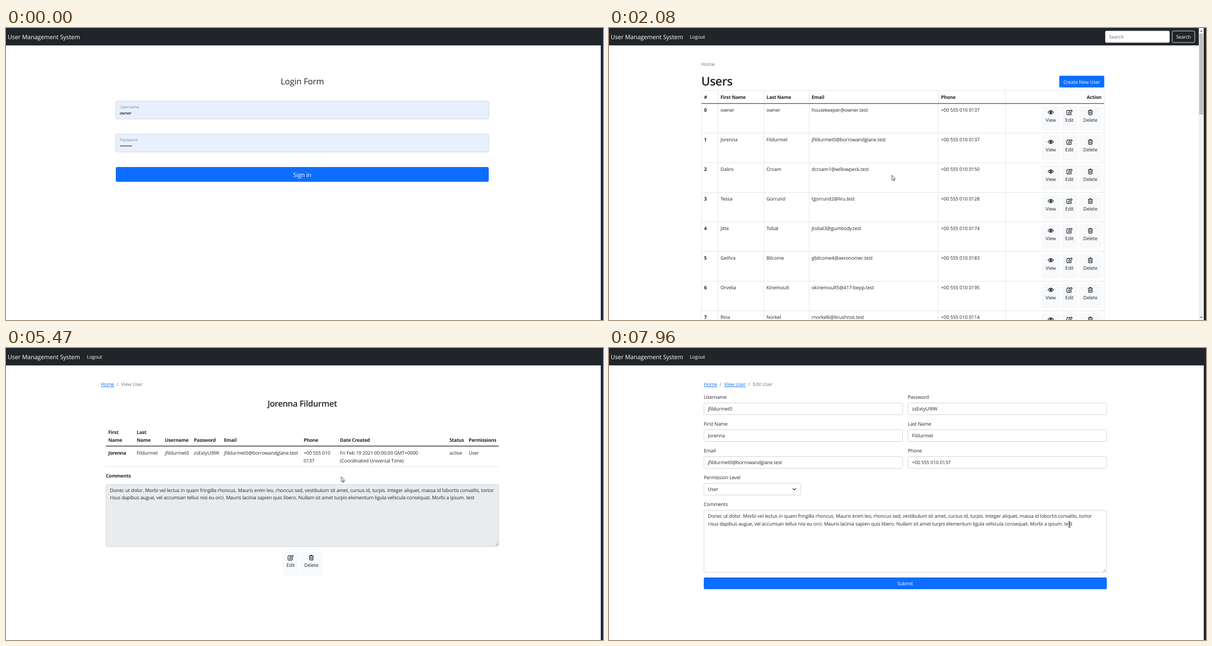
Recreate the animation shown at these times as an HTML page. Size 1071 by 523 pixels, loop 8 s.

```html
<!DOCTYPE html>
<html lang="en">
<head>
<meta charset="utf-8">
<title>User Management System</title>
<style>
html, body { margin: 0; width: 100%; height: 100%; overflow: hidden; background: #fff; }
svg { display: block; width: 1071px; height: 523px; }
text {
  font: 400 8.62px "Open Sans", "Noto Sans", sans-serif;
  letter-spacing: -.01em; fill: #212529; white-space: pre;
  text-rendering: geometricPrecision;
}
.b { font-weight: 700; letter-spacing: -.025em; }
.w { fill: #fff; }
.g { fill: #6c757d; }
.a { fill: #0d6efd; text-decoration: underline; }
.m { text-anchor: middle; }
.e { text-anchor: end; }
.lg { font-size: 10.77px; }
.h3 { font-size: 15.06px; }
.h1 { font-size: 21.5px; }
.semi { font-weight: 600; letter-spacing: -.025em; }
.label { font-size: 7.33px; fill: #868c97; }
.tiny { font-size: 7.18px; }
.url { font-size: 6.48px; fill: #e4e5e7; }
.field { fill: #fff; stroke: #ced4da; stroke-width: .9; }
.icon { fill: none; stroke: #212529; stroke-width: 1.1; stroke-linecap: round; stroke-linejoin: round; }

.t { opacity: 0; animation: 8s step-end -5ms infinite; }
#login { animation-name: login; }
#users { animation-name: users; }
#view { animation-name: view; }
#edit { animation-name: edit; }
#idle { animation-name: idle; }
#hover { animation-name: hover; }
#press { animation-name: press; }
#viewRing { animation-name: view-ring; }
#editRing { animation-name: edit-ring; }
#viewUrl { animation-name: view-url; }
#editUrl { animation-name: edit-url; }
#click { animation-name: click; }
#arrow { animation-name: arrow; }
#hand { animation-name: hand; }
#beam { animation-name: beam; }
#cursor { animation: move 8s -5ms infinite; }

@keyframes login { 0% { opacity: 1 } 26%, 100% { opacity: 0 } }
@keyframes users { 0% { opacity: 0 } 26% { opacity: 1 } 53.75%, 100% { opacity: 0 } }
@keyframes view { 0% { opacity: 0 } 53.75% { opacity: 1 } 81.5%, 100% { opacity: 0 } }
@keyframes edit { 0% { opacity: 0 } 81.5%, 100% { opacity: 1 } }
@keyframes idle { 0% { opacity: 1 } 21.125%, 100% { opacity: 0 } }
@keyframes hover { 0% { opacity: 0 } 17.875%, 100% { opacity: 1 } }
@keyframes press { 0% { opacity: 0 } 21.125%, 100% { opacity: 1 } }
@keyframes view-ring { 0% { opacity: 0 } 47.25%, 100% { opacity: 1 } }
@keyframes edit-ring { 0% { opacity: 0 } 78.125%, 100% { opacity: 1 } }
@keyframes view-url { 0% { opacity: 0 } 45.625% { opacity: 1 } 53.75%, 100% { opacity: 0 } }
@keyframes edit-url { 0% { opacity: 0 } 76.5% { opacity: 1 } 84.875%, 100% { opacity: 0 } }
@keyframes click {
  0%, 26%, 50.5%, 79.875%, 100% { opacity: 0 }
  21.125%, 47.25%, 78.125% { opacity: 1 }
}
@keyframes arrow {
  0%, 26%, 53.75%, 68.375%, 79.875% { opacity: 1 }
  17.875%, 45.625%, 61.875%, 76.5%, 84.875%, 100% { opacity: 0 }
}
@keyframes hand {
  0%, 26%, 53.75%, 79.875%, 100% { opacity: 0 }
  17.875%, 45.625%, 76.5% { opacity: 1 }
}
@keyframes beam {
  0%, 68.375% { opacity: 0 }
  61.875%, 84.875%, 100% { opacity: 1 }
}
/* the pointer is sampled about every 130 ms */
@keyframes move {
  0% { transform: translate(1100px, 0); animation-timing-function: steps(1) }
  3.25% { transform: translate(1038px, 512px); animation-timing-function: steps(3) }
  8.125% { transform: translate(850px, 300px); animation-timing-function: steps(3) }
  13% { transform: translate(526px, 227px); animation-timing-function: steps(1) }
  14.625% { transform: translate(515px, 296px); animation-timing-function: steps(1) }
  16.25% { transform: translate(511px, 281px); animation-timing-function: steps(2) }
  19.5% { transform: translate(507.5px, 263.5px); animation-timing-function: steps(1) }
  32.5% { transform: translate(513.5px, 262.5px); animation-timing-function: steps(4) }
  39% { transform: translate(720px, 148px); animation-timing-function: steps(3) }
  43.875% { transform: translate(794px, 184px); animation-timing-function: steps(1) }
  45.625% { transform: translate(794.3px, 209px); animation-timing-function: steps(1) }
  55.375% { transform: translate(794.3px, 209px); animation-timing-function: steps(7) }
  66.75% { transform: translate(618px, 206px); animation-timing-function: steps(7) }
  78.125% { transform: translate(503px, 378px); animation-timing-function: steps(1) }
  83.25% { transform: translate(503px, 378px); animation-timing-function: steps(7) }
  94.625% { transform: translate(825px, 316.5px); animation-timing-function: steps(1) }
  96.25% { transform: translate(838px, 316px); animation-timing-function: steps(1) }
  99.5%, 100% { transform: translate(826px, 316px); animation-timing-function: steps(1) }
}
</style>
</head>
<body>
<svg id="stage" viewBox="0 0 1071 523" xmlns="http://www.w3.org/2000/svg"></svg>
<script>
const text = (x, y, s, cls = '') => `<text x="${x}" y="${y}" class="${cls}">${s}</text>`;
const rect = (x, y, w, h, attrs) => `<rect x="${x}" y="${y}" width="${w}" height="${h}" ${attrs}/>`;
const line = (x1, y1, x2, y2, c = '#dee2e6', w = .8) =>
  `<path d="M${x1},${y1}L${x2},${y2}" stroke="${c}" stroke-width="${w}"/>`;
const group = (id, body) => `<g id="${id}" class="t">${body}</g>`;
const field = (x, y, w, h) => rect(x, y, w, h, 'rx="2.2" class="field"');
const range = (n, fn) => Array.from({ length: n }, (_, i) => fn(i)).join('');

const FIRST = 'Jorenna', LAST = 'Fildurmet', USER = 'jfildurmet0';
const MAIL = USER + '@borrowandglane.test', PASS = 'zsExtyU9lW', PHONE = '+00 555 010 0137';
const NOTE = [
  'Donec ut dolor. Morbi vel lectus in quam fringilla rhoncus. Mauris enim leo, rhoncus sed, vestibulum sit amet, cursus id, turpis. Integer aliquet, massa id lobortis convallis, tortor',
  'risus dapibus augue, vel accumsan tellus nisi eu orci. Mauris lacinia sapien quis libero. Nullam sit amet turpis elementum ligula vehicula consequat. Morbi a ipsum. test'
];
const PEOPLE = [
  ['owner', 'owner', 'housekeeper@owner.test', PHONE],
  [FIRST, LAST, MAIL, PHONE],
  ['Daliro', 'Croam', 'dcroam1@willowpeck.test', '+00 555 010 0150'],
  ['Tessa', 'Gorrund', 'tgorrund2@liru.test', '+00 555 010 0128'],
  ['Jitte', 'Tobal', 'jtobal3@gumbody.test', '+00 555 010 0174'],
  ['Gethra', 'Bilcome', 'gbilcome4@aeronomer.test', '+00 555 010 0183'],
  ['Orvelia', 'Kinemoult', 'okinemoult5@417-bepp.test', '+00 555 010 0195'],
  ['Rina', 'Norkel', 'rnorkel6@brushnot.test', '+00 555 010 0114']
];

const defs = `<defs>
  <g id="iView" class="icon"><path d="M-5,0Q0,-6.2 5,0Q0,6.2 -5,0Z"/>
    <circle r="1.7" fill="#212529"/><circle cx="-.7" cy="-.7" r=".6" fill="#fff" stroke="none"/></g>
  <g id="iEdit" class="icon"><path d="M.8,-3.4H-3.6Q-4.6,-3.4 -4.6,-2.4V3.4Q-4.6,4.4 -3.6,4.4H2.2Q3.2,4.4 3.2,3.4V1"/>
    <path d="M-1.6,2L-1.3,.1L3.2,-4.4L5,-2.6L.4,1.8Z"/></g>
  <g id="iDelete" class="icon"><path d="M-4,-3H4M-1.5,-3.2L-1,-4.4H1L1.5,-3.2M-3.2,-3V3.6Q-3.2,4.5 -2.3,4.5H2.3Q3.2,4.5 3.2,3.6V-3M-1.2,-1V2.7M1.2,-1V2.7"/></g>
</defs>`;

const nav = (w, logout) => rect(0, 0, w, 31.2, 'fill="#212529"')
  + text(3, 20, 'User Management System', 'w lg')
  + (logout ? text(145, 19, 'Logout', 'w') : '');

const tool = (name, x, y, w) => rect(x, y, w, 44, 'rx="2" fill="#f8f9fa"')
  + `<use href="#i${name}" x="${x + w / 2}" y="${y + 11.5}"/>`
  + text(x + w / 2, y + 28, name, 'm');

const ring = (id, x, y, w, h) => group(id, rect(x, y, w, h, 'rx="3" fill="none" stroke="#dfe1e3" stroke-width="2"'));
const grip = (x, y) => line(x - 6, y - 1.5, x - 1.5, y - 6, '#777', .7) + line(x - 3.5, y - 1.5, x - 1.5, y - 3.5, '#777', .7);
const crumbs = (...items) => items.map(([x, s, cls]) => text(x, 68, s, cls)).join('');

function loginScene() {
  const box = y => rect(197, y, 669, 32, 'rx="2.2" fill="#e8f0fe" stroke="#ced4da" stroke-width=".9"');
  const dots = (step, r) => range(8, i => `<circle cx="${205.6 + i * step}" cy="211.2" r="${r}" fill="#212529"/>`);
  const button = c => rect(197, 249, 669, 26.5, `rx="2.7" fill="${c}"`);
  return nav(1067) + text(531.5, 101, 'Login Form', 'h3 m')
    + box(131) + text(204, 143.5, 'Username', 'label')
    + box(190) + text(204, 202.5, 'Password', 'label')
    + group('idle', text(204, 155, 'owner', 'tiny semi') + dots(2.7, 1))
    + button('#0d6efd')
    + group('hover', button('#0b5ed7'))
    + group('press', text(204, 155, 'owner') + dots(3.7, 1.4)
      + rect(195.9, 247.9, 671.2, 28.7, 'rx="3.6" fill="none" stroke="#98c1fe" stroke-width="2.3"') + button('#0a58ca'))
    + text(531.5, 267, 'Sign in', 'lg w m');
}

function userRow(p, i) {
  const y = 135.5 + 53 * i, cols = [200, 282.5, 363.5, 595.5];
  return text(170.5, y + 14.7, i, 'b')
    + p.map((s, k) => text(cols[k], y + 14.7, s)).join('')
    + tool('View', 776, y + 4, 33) + tool('Edit', 811.5, y + 4, 29) + tool('Delete', 843.5, y + 4, 40)
    + line(166, y + 53, 888, y + 53);
}

function usersScene() {
  const heads = [[170.5, '#'], [200, 'First Name'], [282.5, 'Last Name'], [363.5, 'Email'], [595.5, 'Phone']];
  return nav(1058, true)
    + field(890.5, 5.3, 115, 20.7) + text(897, 19, 'Search', 'g')
    + rect(1010.4, 5.3, 40.4, 20.7, 'rx="2.2" fill="none" stroke="#f8f9fa" stroke-width=".8"') + text(1030.7, 19, 'Search', 'w m')
    + text(165.5, 68, 'Home', 'g') + text(165.5, 103, 'Users', 'h1 semi')
    + rect(807.7, 85.4, 80.8, 21.2, 'rx="2.2" fill="#0d6efd"') + text(848.2, 99.5, 'Create New User', 'w m')
    + line(166, 111.9, 888, 111.9)
    + [165.8, 195.5, 278, 359, 590.5, 711.5, 888.2].map(x => line(x, 112, x, 523)).join('')
    + heads.map(([x, s]) => text(x, 127, s, 'b')).join('') + text(883.5, 127, 'Action', 'b e')
    + PEOPLE.map(userRow).join('')
    + line(166, 135.2, 888, 135.2, '#212529', 1.15)
    + ring('viewRing', 775, 192.5, 35, 45)
    + rect(1058, 0, 9, 523, 'fill="#f1f1f1"') + rect(1058.7, 10, 7.6, 145, 'fill="#c1c1c1"')
    + '<path d="M1060.5,6.5h4l-2,-2.4zM1060.5,517h4l-2,2.4z" fill="#505050"/>';
}

function viewScene() {
  const cols = [[285, 'Username', USER], [337, 'Password', PASS], [391, 'Email', MAIL], [534, 'Phone', PHONE.slice(0, 11)],
    [599, 'Date Created', 'Fri Feb 19 2021 00:00:00 GMT+0000'], [795.5, 'Status', 'active'], [830, 'Permissions', 'User']];
  return nav(1067, true)
    + crumbs([170, 'Home', 'a'], [198.5, '/', 'g'], [206.5, 'View User', 'g'])
    + text(531.5, 105, FIRST + ' ' + LAST, 'h3 semi m')
    + text(183.5, 154, 'First', 'b') + text(183.5, 167.5, 'Name', 'b') + text(183.5, 191, FIRST, 'b')
    + text(234.5, 154, 'Last', 'b') + text(234.5, 167.5, 'Name', 'b') + text(234.5, 191, LAST)
    + cols.map(([x, h, s]) => text(x, 167.5, h, 'b') + text(x, 191, s)).join('')
    + text(534, 204.5, PHONE.slice(12)) + text(599, 204.5, '(Coordinated Universal Time)')
    + line(179, 175.6, 884, 175.6, '#212529', 1.15) + line(179, 212.5, 884, 212.5)
    + text(179, 231.5, 'Comments', 'b')
    + rect(179.3, 244.5, 704.5, 111, 'rx="2.2" fill="#e9ecef" stroke="#ced4da" stroke-width=".9"')
    + NOTE.map((s, i) => text(186.5, 258 + i * 13.4, s)).join('') + grip(884, 355.5)
    + tool('Edit', 496, 364, 29) + tool('Delete', 528, 364, 39.5)
    + ring('editRing', 495, 363.5, 31, 45.5);
}

function editScene() {
  const input = (x, y, label, s, w = 356.5) => text(x, y - 8, label) + field(x + .3, y, w, 21) + text(x + 7.5, y + 13.7, s);
  return nav(1067, true)
    + crumbs([170, 'Home', 'a'], [198.5, '/', 'g'], [206.5, 'View User', 'a'], [249.7, '/', 'g'], [258, 'Edit User', 'g'])
    + input(170, 98.5, 'Username', USER) + input(536, 98.5, 'Password', PASS)
    + input(170, 146.5, 'First Name', FIRST) + input(536, 146.5, 'Last Name', LAST)
    + input(170, 194.5, 'Email', MAIL) + input(536, 194.5, 'Phone', PHONE)
    + input(170, 242.5, 'Permission Level', 'User', 173.5)
    + '<path d="M329.8,251.6l2.8,2.8l2.8,-2.8" class="icon"/>'
    + text(170, 282.5, 'Comments') + field(170.3, 290.5, 722.5, 111.5)
    + NOTE.map((s, i) => text(177.5, 304.3 + i * 13.4, s)).join('') + grip(892.5, 402)
    + rect(170, 411, 723, 21, 'rx="2.2" fill="#0d6efd"') + text(531.5, 425, 'Submit', 'w m');
}

const status = (id, page, w) => group(id, rect(-3, 511.5, w + 3, 14, 'rx="1.5" fill="#3b3c40"')
  + text(-2, 519.8, `https://nodejs-user-management-system.herokuapp.com/users/${page}/2`, 'url'));

const cursor = `<g id="cursor">
  <circle id="click" class="t" r="7" fill="#ff0" fill-opacity=".5"/>
  <g id="arrow" class="t"><path d="M0,0V9.2L2.1,7.3L3.5,10.4L4.9,9.8L3.5,6.8H6.2Z" fill="#fff" stroke="#222" stroke-width=".8"/></g>
  <g id="hand" class="t"><path d="M-.2,1a1,1 0 0 1 2,0V4.3l3,.7q1.3,.4 1.2,1.8L5.4,11.4H.6L-2.4,7.2q-.4,-1 .8,-1.2L-.2,6.9Z" fill="#fff" stroke="#111" stroke-width=".9"/></g>
  <g id="beam" class="t"><path d="M-1.9,-4.8H1.9M0,-4.8V4.8M-1.9,4.8H1.9" stroke="#111" stroke-width=".9"/></g>
</g>`;

document.getElementById('stage').innerHTML = defs
  + group('login', loginScene()) + group('users', usersScene())
  + group('view', viewScene()) + group('edit', editScene())
  + status('viewUrl', 'viewuser', 224) + status('editUrl', 'edituser', 222)
  + rect(1067, 0, 4, 523, 'fill="#1b2437"') + cursor;
</script>
</body>
</html>
```
